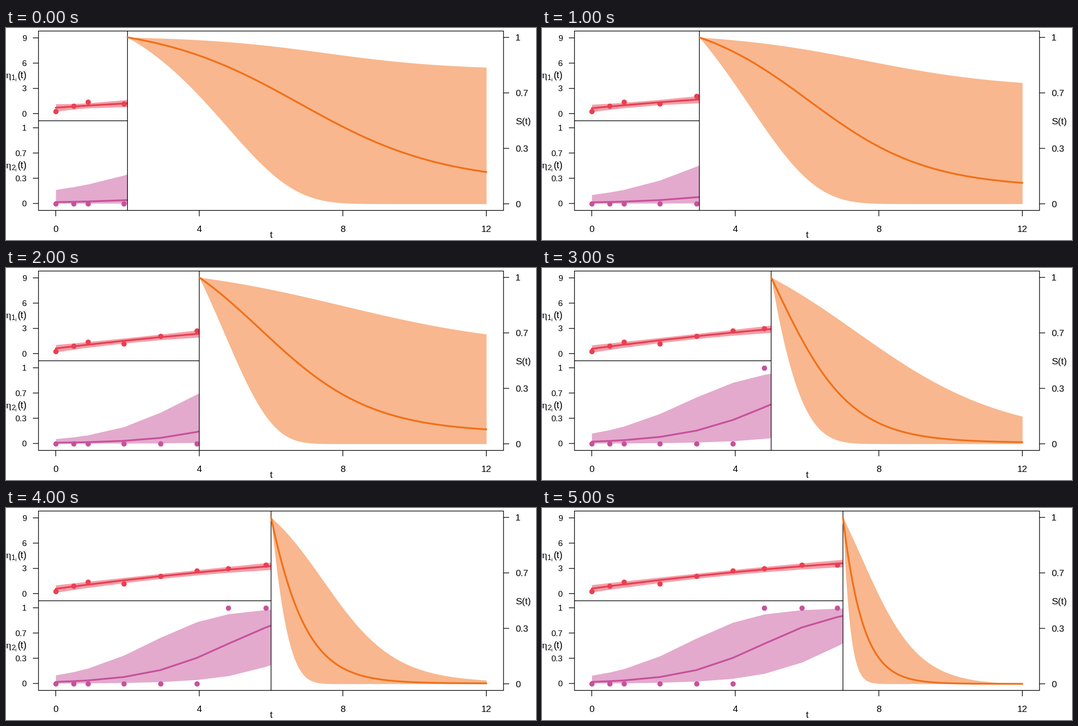
Recreate the animation shown at these times as a matplotlib script. Size 1183 px wide and 473 px high, loop 6 s.

```python
import numpy as np
import matplotlib.pyplot as plt
from matplotlib.animation import FuncAnimation

WIDTH, HEIGHT, DPI = 1183, 473, 100
PX = 72 / DPI  # points per pixel
LEFT, RIGHT, TOP, MIDDLE, BOTTOM = 72.5, 1110.5, 6.7, 207, 407
RED, PINK = "#EA3F52", "#F4A0AA"
PURPLE, LILAC = "#C7529C", "#E3AACD"
ORANGE, PEACH = "#F27019", "#F8B78E"
END = 12

VISITS = np.array([0, 0.5, 0.9, 1.9, 2.92, 3.93, 4.81, 5.85, 6.84])
MARKERS = np.array([0.27, 0.88, 1.38, 1.15, 2.08, 2.74, 2.98, 3.41, 3.41])
EVENTS = (VISITS > 4.5).astype(float)

# Fitted trajectories, one (intercept, slope) per landmark time.
MARKER_FIT = [(0.7, 0.3), (0.64, 0.41), (0.61, 0.52), (0.57, 0.57), (0.57, 0.57), (0.6, 0.57)]
EVENT_FIT = [(-4, 0.44), (-4.2, 0.57), (-4.7, 0.7), (-3.7, 0.68), (-3.85, 0.75), (-3.85, 0.75)]

# Survival per landmark time: (midpoint, width, final value) of a sigmoid for the
# mean and the upper bound, (scale, growth) of a Gompertz law for the lower bound.
SURVIVAL = [
    ((4.8, 4, 0.191), (5.5, 3.5, 0.82), (0.23, 0.53)),
    ((3.05, 3.3, 0.126), (4.6, 4, 0.728), (0.47, 0.54)),
    ((1.7, 3.1, 0.087), (4, 5, 0.659), (0.594, 0.75)),
    ((0, 2.17, 0.01), (2.35, 4.2, 0.165), (2.52, 0.5)),
    ((-1.03, 1.54, 0.003), (1.45, 2, 0.022), (2.75, 0.8)),
    ((-1.5, 1.05, 0), (0.52, 1.58, 0), (13, 0.4)),
]


def time_x(t):
    return 111 + 80.1 * t


def marker_y(value):
    return 191 - 18.77 * value


def event_y(probability):
    return 391.5 - 168.5 * probability


def survival_y(probability):
    return 392.3 - 371.3 * probability


def logistic(z):
    return 1 / (1 + np.exp(-z))


def sigmoid_fall(u, midpoint, width, final):
    """Fall from 1 at the first u to the final value at the last u."""
    rise = np.tanh((u - midpoint) / width)
    return 1 - (1 - final) * (rise - rise[0]) / (rise[-1] - rise[0])


def gompertz(u, scale, growth):
    return np.exp(-scale * np.expm1(growth * u))


def marker_curves(t, step):
    start, slope = MARKER_FIT[step]
    mean = start + slope * t - 0.02 * t**2
    half = 0.3 + 0.14 * (2 * t / t[-1] - 1) ** 2
    return mean + half, mean, mean - half


def event_curves(t, step):
    start, slope = EVENT_FIT[step]
    mean = start + slope * t + 0.015 * t**2
    above = 1.65 + 0.85 * 0.6**step + 0.025 * t**2
    below = 3.5 - 0.3 * step
    return logistic(mean + above), logistic(mean), logistic(mean - below)


def survival_curves(t, step):
    mean, upper, lower = SURVIVAL[step]
    u = t - t[0]
    return sigmoid_fall(u, *upper), sigmoid_fall(u, *mean), gompertz(u, *lower)


fig = plt.figure(figsize=(WIDTH / DPI, HEIGHT / DPI), dpi=DPI, facecolor="white")
ax = fig.add_axes([0, 0, 1, 1])


def stroke(xs, ys, color="black", width=1.5, **style):
    style = {"solid_capstyle": "round", "solid_joinstyle": "round", "zorder": 4} | style
    return ax.plot(xs, ys, color=color, lw=width * PX, snap=False, **style)[0]


def label(x, y, text, size, align="left", font="Liberation Sans"):
    ax.text(x, y, text, fontsize=size * PX, ha=align, va="baseline", family=font)


def draw_axes(landmark):
    stroke([LEFT, RIGHT, RIGHT, LEFT, LEFT], [TOP, TOP, BOTTOM, BOTTOM, TOP])
    stroke([landmark] * 2, [TOP, BOTTOM])
    stroke([LEFT, landmark], [MIDDLE] * 2)
    thirds = ["0", "0.3", "0.7", "1"]
    for base, names in ((191, "0369"), (391.5, thirds)):
        for i, name in enumerate(names):
            y = base - 56.3 * i
            stroke([60.5, LEFT], [y, y])
            label(46, y + 6.7, name, 18.5, "right")
    for i, name in enumerate(thirds):
        y = survival_y(i / 3)
        stroke([RIGHT, 1122.5], [y, y])
        label(1137, y + 7.3, name, 20.5)
    for t in range(0, END + 1, 4):
        x = time_x(t)
        stroke([x, x], [BOTTOM, 419.5])
        label(x, 454.5, str(t), 20.5, "center")
    label(591.5, 468, "t", 21.5, "center")
    label(1137, 215, "S(t)", 21.5)
    for y, index in ((112, "1"), (312.5, "2")):
        label(0, y, "η", 22.5, font="Liberation Serif")
        label(12, y + 4, index, 16)
        label(20.5, y + 7, "i", 11)
        label(47, y, "(t)", 22, "right")


def draw_curves(t, curves, to_y, color, shade, **style):
    upper, mean, lower = map(to_y, curves)
    xs = time_x(t)
    ax.fill_between(xs, upper, lower, color=shade, lw=0, zorder=2)
    return stroke(xs, mean, color, 4, **style)


def draw_history(step, curves, values, to_y, color, shade):
    landmark = 2 + step
    seen = VISITS < landmark
    t = np.append(VISITS[seen], landmark)
    line = draw_curves(t, curves(t, step), to_y, color, shade, zorder=3)
    dots = ax.scatter(time_x(VISITS[seen]), to_y(values[seen]), s=(11.8 * PX) ** 2,
                      color=color, lw=0, snap=False, zorder=3)
    for artist in (line, dots):
        artist.set_clip_path(plt.Rectangle((0, 0), time_x(landmark), HEIGHT,
                                           transform=ax.transData))


def draw(step):
    ax.clear()
    ax.set(xlim=(0, WIDTH), ylim=(HEIGHT, 0))
    ax.axis("off")
    landmark = 2 + step
    draw_axes(time_x(landmark))
    draw_history(step, marker_curves, MARKERS, marker_y, RED, PINK)
    draw_history(step, event_curves, EVENTS, event_y, PURPLE, LILAC)
    t = np.linspace(landmark, END, 400)
    draw_curves(t, survival_curves(t, step), survival_y, ORANGE, PEACH, zorder=5)


anim = FuncAnimation(fig, draw, frames=6, interval=1000, repeat=True, repeat_delay=0)
plt.show()
```
